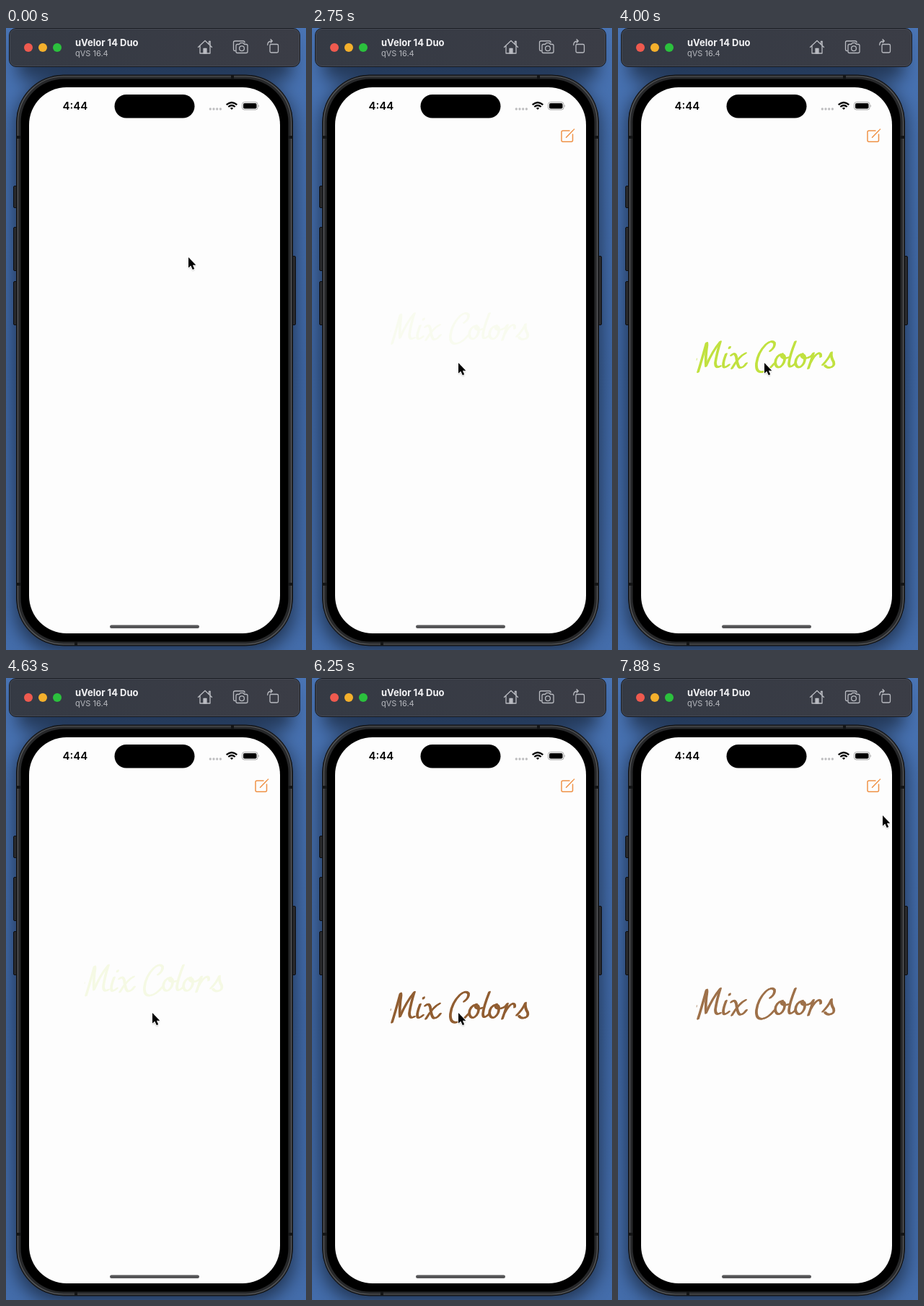
Animation of 416 by 860 pixels, one loop 8 s. Source, as an HTML page:

```html
<!DOCTYPE html>
<html lang="en">
<head>
<meta charset="utf-8">
<title>Mix Colors</title>
<style>
  html, body { margin: 0; width: 100%; height: 100%; overflow: hidden; background: #3d639f; }
  svg { display: block; width: 100%; height: 100%; }
  text { font-family: Inter, "Liberation Sans", sans-serif; }
  .line { fill: none; stroke-linecap: round; stroke-linejoin: round; }
</style>
</head>
<body>
<svg viewBox="0 0 416 860" preserveAspectRatio="none">
  <defs>
    <linearGradient id="desk" x2="0" y2="1">
      <stop offset="0" stop-color="#4a75b6"/>
      <stop offset=".15" stop-color="#456fae"/>
      <stop offset=".55" stop-color="#3f67a4"/>
      <stop offset="1" stop-color="#446dab"/>
    </linearGradient>
    <linearGradient id="bar">
      <stop offset="0" stop-color="#353a44"/>
      <stop offset="1" stop-color="#3b3d46"/>
    </linearGradient>
    <filter id="blur" x="-20%" y="-20%" width="140%" height="140%"><feGaussianBlur stdDeviation="12"/></filter>
    <filter id="soft" x="-50%" y="-50%" width="200%" height="200%"><feGaussianBlur stdDeviation="1"/></filter>
    <path id="arrow" d="M0 0V14.5L3.3 11.5L5.8 17L8.2 16L5.9 10.7H10.3Z"/>
    <g id="lettering" class="line">
      <path d="M111 478Q116 462 122 440Q123.500 435 123.500 441Q121 458 122 470Q131 449 142 436Q137 452 135 465Q135 474 142 470"/>
      <path d="M150 453Q146 463 146 468Q146 475 154 468M154.500 445L155 443.500"/>
      <path d="M157 455Q162 450 164 457Q166 473 170 472Q174 472 178 466M177 452Q168 456 158 473"/>
      <path d="M211 449Q218 444 217 438Q213 433 205 440Q194 451 192 466Q191 479 200 478Q208 477 217 466"/>
      <path id="o" d="M228 453Q219 455 218 465Q219 473 225 471Q232 466 231 457Q230 453 226 455Q228 461 236 458"/>
      <path d="M246 436Q238 456 237 466Q237 475 246 466"/>
      <use href="#o" x="28"/>
      <path d="M264 458Q268 457 271 452Q268 462 264 473M267 465Q272 455 278 452Q282 452 281 457"/>
      <path d="M284 468Q292 460 296 451Q295 458 299 464Q301 471 293 472Q289 472 287 469"/>
    </g>
  </defs>

  <rect width="416" height="860" fill="url(#desk)"/>
  <g filter="url(#blur)" opacity=".5">
    <rect x="12" y="74" width="388" height="790" rx="62"/>
    <rect x="16" y="10" width="380" height="62" rx="10"/>
  </g>

  <rect x="4.500" y=".5" width="403" height="53" rx="9.500" fill="url(#bar)" stroke="#171a20"/>
  <rect x="5.500" y="1.500" width="401" height="51" rx="8.500" fill="none" stroke="#51555e" opacity=".55"/>
  <circle cx="31" cy="27" r="6" fill="#ef5a4f"/>
  <circle cx="51" cy="27" r="6" fill="#f4b02c"/>
  <circle cx="71" cy="27" r="6" fill="#2bc13d"/>
  <text x="96" y="25" font-size="13" font-weight="700" fill="#f4f4f6">uVelor 14 Duo</text>
  <text x="96" y="39" font-size="11" fill="#b6b8be">qVS 16.4</text>
  <g class="line" stroke="#b9bbc1" stroke-width="1.300">
    <path d="M266.500 26.500L276 17.500L285.500 26.500M269 24.500V35H283V24.500M281.500 22V18.500H283.200V24"/>
    <path d="M274 35V28.500H278V35Z" fill="#b9bbc1"/>
    <path d="M318 31.500H317Q315.500 31.500 315.500 29.500V20Q315.500 18 317.500 18H329Q331 18 331 20"/>
    <path d="M321 22.500H323.500L325 20.700H329L330.500 22.500H333Q335 22.500 335 24.500V32.500Q335 34.500 333 34.500H321Q319 34.500 319 32.500V24.500Q319 22.500 321 22.500Z"/>
    <circle cx="327" cy="28.300" r="3.400"/>
    <rect x="366" y="22.500" width="11.500" height="11.500" rx="1.800"/>
    <path d="M362.700 23.500Q362.700 18 369 18M367 15.800L369.300 18L367 20.200"/>
  </g>

  <g fill="#292a2d" stroke="#0c0d10">
    <rect x="10.500" y="218.500" width="8" height="30" rx="1.500"/>
    <rect x="10.500" y="275.500" width="8" height="60" rx="1.500"/>
    <rect x="10.500" y="350.500" width="8" height="60" rx="1.500"/>
    <rect x="393" y="315.500" width="8.500" height="95" rx="1.500"/>
  </g>
  <rect x="14.500" y="65" width="383" height="789" rx="65" fill="#27282a" stroke="#101113"/>
  <rect x="16.500" y="67" width="379" height="785" rx="63" fill="none" stroke="#56585b" stroke-width="1.200"/>
  <path d="M15 151H20M15 769H20M392 151H397M392 769H397M314 65V70M97 849V854" stroke="#141516" stroke-width="4"/>
  <rect x="20.500" y="70.500" width="371" height="778" rx="60"/>
  <rect x="32" y="82" width="348" height="755" rx="52" fill="#fdfdfd"/>

  <rect x="150.500" y="92" width="111" height="32.500" rx="16.250"/>
  <text x="78.500" y="113" font-size="15" font-weight="600">4:44</text>
  <path class="line" d="M283.300 112H298" stroke="#bdbdbf" stroke-width="3.300" stroke-dasharray="0 4.700"/>
  <g class="line" stroke="#000" stroke-width="2.200" style="stroke-linecap:butt">
    <path d="M305.700 106.200Q313 99.800 320.300 106.200M308.300 109Q313 105 317.700 109"/>
    <path d="M313 113L310.800 110.800Q313 109 315.200 110.800Z" fill="#000" stroke="none"/>
  </g>
  <rect x="327.500" y="102.500" width="21.500" height="10.500" rx="3" fill="none" stroke="#a5a5a5"/>
  <rect x="329" y="104" width="18.500" height="7.500" rx="1.800"/>
  <path d="M350.200 106Q352 107.700 350.200 109.500Z" fill="#999"/>
  <rect x="144" y="825.500" width="124" height="4.500" rx="2.250" fill="#555557"/>

  <path id="compose" class="line" stroke="#ef9247" stroke-width="1.500" d="M357 142H348Q346 142 346 144V155.300Q346 157.300 348 157.300H359.500Q361.500 157.300 361.500 155.300V147M353 150.700L362 141.500M363 140.500L363.500 140M353 150.700L352.500 151.200"/>

  <!-- Overlapping copies along a slanted nib give the brush contrast. -->
  <g id="word" stroke-width="2">
    <use href="#lettering" x="-.9" y=".4"/>
    <use href="#lettering"/>
    <use href="#lettering" x=".9" y="-.4"/>
    <path d="M109.500 459L109 462" stroke-width="1" opacity=".7"/>
  </g>

  <g id="cursor">
    <use href="#arrow" y="1.500" opacity=".35" filter="url(#soft)"/>
    <use href="#arrow" stroke="#fff" stroke-width="1.800" stroke-linejoin="round"/>
    <use href="#arrow"/>
  </g>
</svg>
<script>
const LOOP = 8000, STEP = 125;
const FIRST = 320, CYCLE = 2270, FADE = 1000, HOLD = 260, RISE = 44.3;
const COLORS = ["#ec5c5c", "#bee036", "#8d582a", "#8d582a"];
const byId = id => document.getElementById(id);
const word = byId("word"), cursor = byId("cursor"), compose = byId("compose");

const ease = x => {
  const p = Math.min(1, Math.max(0, x));
  return (1 - Math.cos(Math.PI * p)) / 2;
};
const between = (t, from, to) => ease((t - from) / (to - from));

function cursorAt(t) {
  const down = between(t, 125, 1000), away = between(t, 7125, 7875);
  return [253 - 50 * down + 164 * away, 317 + 146 * down - 273 * away];
}

function render(t) {
  const cycle = Math.floor((t - FIRST) / CYCLE);
  const local = t - FIRST - cycle * CYCLE;
  // Each word drops in, rests, then rises back out.
  const shown = cycle < 0 ? 0 : ease(local / FADE) - ease((local - FADE - HOLD) / FADE);
  word.setAttribute("stroke", COLORS[Math.max(0, cycle)]);
  word.setAttribute("opacity", shown);
  word.setAttribute("transform", `translate(0 ${-RISE * (1 - shown)})`);
  cursor.setAttribute("transform", `translate(${cursorAt(t)})`);
  compose.setAttribute("opacity", t < 250 ? 0 : 1);
}

const start = performance.now();
function tick() {
  const t = (performance.now() - start) % LOOP;
  render(Math.floor(t / STEP) * STEP);
  requestAnimationFrame(tick);
}
tick();
</script>
</body>
</html>
```
